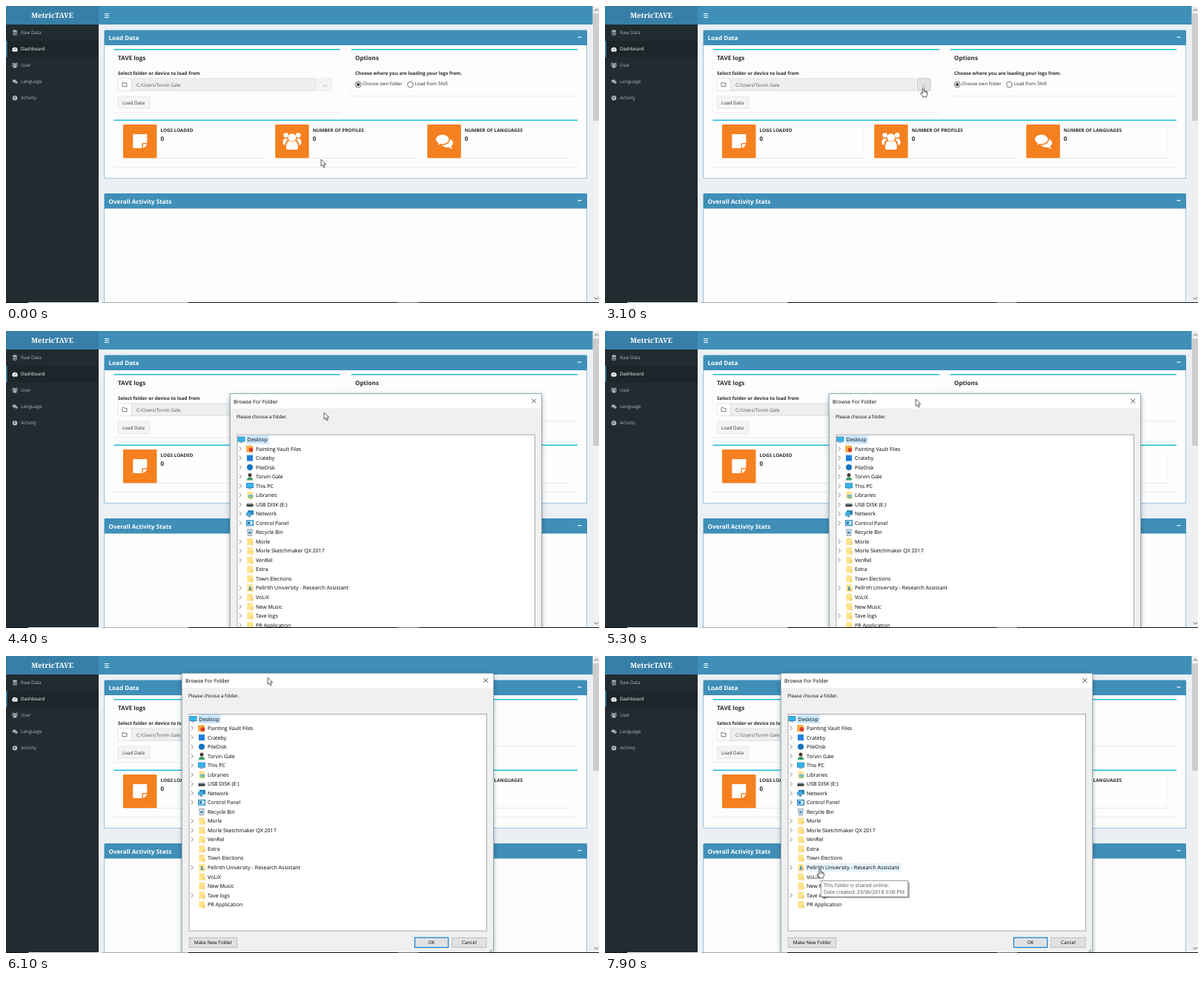
An HTML page for the animation above (8 s loop, 800 px wide and 401 px high).

```html
<!DOCTYPE html>
<html lang="en">
<head>
<meta charset="utf-8">
<title>Dashboard</title>
<style>
html, body { margin: 0; width: 100%; height: 100%; overflow: hidden; background: #ecf0f5; }
svg { display: block; width: 800px; height: 401px; }
text { font: 6.3px "Open Sans", "Noto Sans", sans-serif; fill: #2b2b2b; text-rendering: geometricPrecision; }
.brand { font: 700 9.6px "Noto Serif", serif; fill: #fff; text-anchor: middle; }
.head { font-size: 8.1px; font-weight: 700; }
.bold { font-size: 6.35px; font-weight: 700; }
.count { font-size: 8px; font-weight: 700; }
.radio { font-size: 6.15px; }
.white { fill: #fff; }
.nav { fill: #aab7bd; }
.muted { fill: #555; font-size: 6.25px; }
.dlg text { fill: #000; font-size: 7.05px; }
.dlg .small { font-size: 6.4px; }
.mid { text-anchor: middle; }
.tip text { fill: #4f4f4f; font-size: 6.9px; }
.line { fill: none; stroke-linecap: round; stroke-linejoin: round; }
</style>
</head>
<body>
<svg viewBox="0 0 800 401" xmlns="http://www.w3.org/2000/svg">
  <defs>
    <g id="users">
      <circle cy="-5" r="5.300"/>
      <path d="M-8 9C-8 2-5-1-3.500 0Q0 2 3.500 0C5-1 8 2 8 9Q8 11.500 5 11.500H-5Q-8 11.500-8 9Z"/>
      <g id="side">
        <circle cx="-8.300" cy="-8" r="3.300"/>
        <path d="M-6-2Q-9.500 1-9.500 5H-10.500Q-12.500 5-12.500 2.500C-12.500-2-11-4-9.500-3.500Q-8-3-6.500-3.500Z"/>
      </g>
      <use href="#side" transform="scale(-1 1)"/>
    </g>
    <g id="chat">
      <ellipse cx="4" cy="2.500" rx="8" ry="6"/>
      <path d="M5 7Q8 10 11 10.500Q9 8 9 5Z"/>
      <path d="M-2.500-9.500C3-9.500 7.200-6.500 7.200-2.500S3 4.500-2.500 4.500L-5 4.300Q-7 6.500-10.500 6.800Q-8.500 5-8.300 3Q-12-.200-12-2.500C-12-6.500-8-9.500-2.500-9.500Z" stroke="var(--gap)" stroke-width="1.600"/>
    </g>
    <g id="note">
      <path d="M-9.500-8.500Q-9.500-9.500-8.500-9.500H8.500Q9.500-9.500 9.500-8.500V2.500H4Q2.500 2.500 2.500 4V9.500H-8.500Q-9.500 9.500-9.500 8.500Z"/>
      <path d="M4 4H9.300Q9 5.500 8 6.600L6.600 8Q5.500 9 4 9.300Z"/>
    </g>
    <g id="arrow">
      <path d="M0 0V9.200L2.100 7.300L3.700 10.900L5.200 10.200L3.700 6.700H6.700Z" fill="#fff" stroke="#222" stroke-width=".700"/>
    </g>
    <g id="hand">
      <path d="M-1 1Q-1 0 0 0T1 1V4.300Q2 3.700 2.700 4.500Q3.700 4.100 4.200 5Q5.300 4.700 5.400 6V8.300Q5.400 10 4.500 11V12.300H-1V11.200L-3.500 7.600Q-3.800 6.500-2.800 6.500Q-1.800 6.600-1 7.700Z" fill="#fff" stroke="#222" stroke-width=".750"/>
      <path d="M1 4.300V6.500M2.700 4.700V6.600M4.200 5.200V6.800" class="line" stroke="#222" stroke-width=".500"/>
    </g>
    <filter id="shadow" x="-5%" y="-5%" width="110%" height="112%">
      <feDropShadow dx="0" dy="2" stdDeviation="3" flood-opacity=".300"/>
    </filter>
  </defs>

  <rect width="800" height="401" fill="#ecf0f5"/>
  <rect x="125" width="667" height="25" fill="#3f8fb8"/>
  <rect width="125" height="401" fill="#222b30"/>
  <rect width="125" height="25" fill="#387fa7"/>
  <rect y="47" width="125" height="22" fill="#1c2529"/>
  <rect y="47" width="1.500" height="22" fill="#3f8fb8"/>
  <text class="brand" x="62.500" y="16">MetricTAVE</text>
  <path d="M133 10.500H139M133 13H139M133 15.500H139" stroke="#fff" stroke-width="1.100"/>

  <g fill="#aab7bd" style="--gap:#222b30">
    <path d="M9 34Q9 32.300 12 32.300T15 34T12 35.500T9 34ZM9 35.700Q12 37.200 15 35.700V37Q12 38.500 9 37ZM9 38Q12 39.500 15 38V39Q12 40.500 9 39Z"/>
    <path d="M8.300 59.500A3.700 3.700 0 0 1 15.700 59.500L15 61.500H9Z" fill="#fff"/>
    <path d="M11.600 60L13 56.500M9.700 59H10.400M14 59H14.600" stroke="#1c2529" stroke-width=".700"/>
    <use href="#users" transform="translate(12 80) scale(.300)"/>
    <use href="#chat" transform="translate(12 102) scale(.300)"/>
    <circle cx="12" cy="124.300" r="3.300"/>
    <path d="M12 122.300V124.500H10.600" class="line" stroke="#222b30" stroke-width=".700"/>
  </g>
  <g id="nav"></g>

  <g id="panels"></g>
  <g id="cards"></g>

  <text class="head" x="151" y="72.800">TAVE logs</text>
  <text class="bold" x="151" y="92.700">Select folder or device to load from</text>
  <rect x="151" y="97.800" width="18.500" height="16.700" fill="#fff" stroke="#d2d6de" stroke-width=".600"/>
  <path d="M157.300 103.500H159.300L160 104.300H163V108.700H157.300Z" class="line" stroke="#444" stroke-width=".700"/>
  <rect x="169.500" y="97.800" width="249.300" height="16.700" fill="#eee" stroke="#d2d6de" stroke-width=".600"/>
  <text class="muted" x="176" y="108.500">C:/Users/Torvin Gale</text>
  <rect id="browse" x="421.300" y="97.800" width="17.700" height="16.700" rx="1" stroke-width=".600"/>
  <text class="mid" x="430.300" y="108">...</text>
  <rect x="151" y="122" width="43" height="16.500" rx="1" fill="#f4f4f4" stroke="#ddd" stroke-width=".600"/>
  <text x="157" y="132.700">Load Data</text>

  <text class="head" x="471" y="72.800">Options</text>
  <text class="bold" x="471" y="92.700">Choose where you are loading your logs from.</text>
  <circle id="ring" cx="475.200" cy="106" r="3.900" fill="#fff" stroke-width=".900"/>
  <circle id="dot" cx="475.200" cy="106" r="2"/>
  <text class="radio" x="481" y="106.800">Choose own folder</text>
  <circle cx="545.500" cy="106" r="3.900" fill="#fff" stroke="#555" stroke-width=".800"/>
  <text class="radio" x="551.500" y="106.800">Load from TAVE</text>

  <rect x="791.500" width="8.500" height="401" fill="#f0f0f0"/>
  <rect x="792" y="10" width="8" height="145" fill="#cdcdcd"/>
  <path d="M794 6.500L796.500 4L799 6.500M794 393.500L796.500 396L799 393.500" class="line" stroke="#505050" stroke-width="1"/>

  <g id="dialog" class="dlg">
    <rect width="421" height="378" fill="#f0f0f0" filter="url(#shadow)"/>
    <rect width="421" height="20" fill="#fff"/>
    <rect x=".200" y=".200" width="420.600" height="377.600" fill="none" stroke="#5d8299" stroke-width=".700"/>
    <text x="5" y="13">Browse For Folder</text>
    <path d="M407.300 7L413.300 13M413.300 7L407.300 13" stroke="#222" stroke-width=".800"/>
    <text class="small" x="9" y="33.300">Please choose a folder.</text>
    <rect x="10" y="55.600" width="401.300" height="292.500" fill="#fff" stroke="#828790" stroke-width=".700"/>
    <g id="rows"></g>
    <g id="buttons"></g>
    <path d="M419 372V377H414Z" fill="#bbb"/>
  </g>

  <g id="tip" class="tip">
    <rect x="293" y="305.500" width="118" height="21.500" fill="#000" opacity=".300"/>
    <rect x="291.300" y="303.500" width="117.500" height="21.500" fill="#fff" stroke="#767676" stroke-width=".700"/>
    <text x="295" y="312.300">This folder is shared online.</text>
    <text x="295" y="321.300">Date created: 23/06/2018 3:00 PM</text>
  </g>

  <rect y="400" width="800" height="1" fill="#111"/>
  <rect x="30" y="400" width="100" height="1" fill="#eee"/>
  <rect x="130" y="400" width="116" height="1" fill="#aaa"/>
  <rect x="529" y="400" width="27" height="1" fill="#777"/>

  <g id="cursor"><use href="#arrow"/><use href="#hand"/></g>
</svg>

<script>
const $ = id => document.getElementById(id);
const rect = (x, y, w, h, fill, more = '') =>
  `<rect x="${x}" y="${y}" width="${w}" height="${h}" fill="${fill}" ${more}/>`;
const label = (x, y, str, cls = '') => `<text x="${x}" y="${y}" class="${cls}">${str}</text>`;

// Sidebar
$('nav').innerHTML = ['Raw Data', 'Dashboard', 'User', 'Language', 'Activity']
  .map((s, i) => label(20, 38.2 + 22 * i, s, i === 1 ? 'white' : 'nav')).join('');

// Main boxes and the cyan-topped boxes inside; the page is shown at half size
const panel = (y, h, title) =>
  rect(132.5, y, 651.5, h, '#3f8fb8', 'rx="1.5"') +
  rect(133, y + 20.5, 650.5, h - 21, '#fdfdfd', 'rx=".5"') +
  label(138.5, y + 13.5, title, 'head white') +
  rect(771.5, y + 9, 4.8, 1.2, '#fff');
const inner = (x, y, w, h) =>
  rect(x, y, w, h, '#fdfdfd', 'stroke="#f5f5f5" stroke-width=".6"') +
  rect(x, y + h, w, .7, '#e6e6e6') +
  rect(x, y, w, 1.5, '#22bfdb');
$('panels').innerHTML =
  panel(32.5, 200.5, 'Load Data') + panel(253, 160, 'Overall Activity Stats') +
  inner(145.5, 58, 305.25, 85.5) + inner(465.75, 58, 305.25, 63.5) + inner(145.5, 153.5, 625.5, 64);

// Counter cards, three equal columns
const card = (column, title, icon) => {
  const x = 158 + 205.17 * column;
  return rect(x, 160, 190.2, 45, '#fefefe', 'stroke="#f4f4f4" stroke-width=".6"') +
    rect(x, 205, 190.2, .7, '#e3e3e3') +
    rect(x, 160, 45.5, 45.2, '#f58020', 'rx="1"') +
    `<use href="#${icon}" x="${x + 22.8}" y="182.5" fill="#fff" style="--gap:#f58020"/>` +
    label(x + 50.5, 169.9, title, 'bold') + label(x + 50.5, 182.3, '0', 'count');
};
$('cards').innerHTML = card(0, 'LOGS LOADED', 'note') +
  card(1, 'NUMBER OF PROFILES', 'users') + card(2, 'NUMBER OF LANGUAGES', 'chat');

// Tree icons, drawn in a 10 by 10 box
const folder = rect(1.3, .3, 7.9, 9.4, '#ffe48f', 'rx=".5"') + rect(7, 5, 2.5, 4.7, '#f6d170');
const screen = rect(0, 1, 10, 7, '#2f7fae') + rect(.7, 1.7, 8.6, 5.5, '#35b6ee') +
  rect(3, 8.5, 4, .8, '#678');
const person = (c, hair) => `<circle cx="5" cy="3" r="2.5" fill="${hair}"/>` +
  `<path d="M1 10Q1 5.8 5 5.8T9 10Z" fill="${c}"/>`;
const icons = {
  folder, screen,
  orange: rect(0, .5, 9, 9, '#f6b04a', 'rx="1"') + '<circle cx="6.5" cy="6.5" r="3" fill="#d8402b"/>',
  square: rect(1, 1, 8, 8, '#1f7fe0'),
  circle: '<circle cx="5" cy="5" r="4" fill="#1673bd"/>',
  person: person('#3a9a62', '#4a3a32'),
  library: folder + rect(3, 4.5, 6, 4, '#5fb4e0') + rect(4.5, 6, 3, 4, '#8fca72'),
  disk: rect(.5, 4, 9, 4, '#3c4043', 'rx="1"') + rect(1.5, 3, 7, 2, '#a9adb0'),
  network: rect(2, .5, 8, 6, '#2b82b5') + rect(0, 3, 7, 5, '#49a9dc') + rect(3, 8, 3, 1.5, '#5a7788'),
  control: rect(0, 1, 10, 8, '#2582b8') + rect(1, 2, 8, 6, '#8fd2f2') +
    '<circle cx="3.5" cy="5" r="1.7" fill="#2a73a5"/>' + rect(6, 3.5, 2, 3, '#fff'),
  bin: '<path d="M1.5 1H8.5L7.5 9.7H2.5Z" fill="#d5dde2" stroke="#7c8c96" stroke-width=".7"/>' +
    '<circle cx="5" cy="5.5" r="1.7" fill="#3c87c9"/>',
  shared: folder + `<g transform="translate(2.7 3) scale(.5)">${person('#2b78b8', '#2b78b8')}</g>`
};

// name, icon, chevron: 0 none, 1 always, 2 only while loading
const items = [
  ['Desktop', 'screen', 0], ['Painting Vault Files', 'orange', 1], ['Crateby', 'square', 1],
  ['PileDisk', 'circle', 1], ['Torvin Gale', 'person', 1], ['This PC', 'screen', 1],
  ['Libraries', 'library', 1], ['USB DISK (E:)', 'disk', 1], ['Network', 'network', 1],
  ['Control Panel', 'control', 1], ['Recycle Bin', 'bin', 0], ['Morle', 'folder', 1],
  ['Morle Sketchmaker QX 2017', 'folder', 1], ['VenRel', 'folder', 1], ['Extra', 'folder', 0],
  ['Town Elections', 'folder', 0], ['Pellrith University - Research Assistant', 'shared', 1],
  ['VoLiX', 'folder', 2], ['New Music', 'folder', 2], ['Tave logs', 'folder', 1],
  ['PR Application', 'folder', 2]
];
const PITCH = 12.53, TOP = 55.75;
$('rows').innerHTML = items.map(([name, icon, chevron], i) => {
  const y = 62 + PITCH * i, x = i ? 22 : 10.5;
  const mark = chevron ? `<path d="M13 ${y - 2.5}L15.6 ${y}L13 ${y + 2.5}" class="line${
    chevron === 2 ? ' loading' : ''}" stroke="#777" stroke-width=".9"/>` : '';
  return `<g class="row">${rect(x + 11.5, y - 6, 0, 12, i ? '#e5f3fb' : '#cce8ff', 'class="hit"')}${mark}` +
    `<g transform="translate(${x} ${y - 5})">${icons[icon]}</g>${label(x + 13, y + 2.5, name)}</g>`;
}).join('');

const button = (x, w, str, main) =>
  rect(x, 357.2, w, 13.3, '#e1e1e1', `stroke="${main ? '#0078d7' : '#adadad'}" stroke-width="${main ? 1.1 : .7}"`) +
  label(x + w / 2, 366.3, str, 'small mid');
$('buttons').innerHTML = button(10.2, 64.5, 'Make New Folder') +
  button(314.5, 45.2, 'OK', true) + button(364.8, 46.2, 'Cancel');

const hits = [...document.querySelectorAll('.hit')];
const names = [...document.querySelectorAll('.row text')];
const loading = [...document.querySelectorAll('.loading')];
const [arrow, hand] = $('cursor').children;

// time, x, y, eased arrival
const pointerPath = [
  [0, 425, 207], [500, 425, 207], [1500, 488, 104, 1], [2000, 488, 104], [2800, 429.5, 110.5, 1],
  [4900, 429, 110], [5400, 418, 90, 1], [5900, 367, 47], [6000, 358, 36], [6100, 353, 29],
  [6400, 353, 29], [7000, 290, 287.5, 1], [8000, 290, 287.5]
];
const dialogPath = [[0, 302, 84.5], [5500, 302, 84.5], [5900, 258, 49], [6100, 237, 23], [8000, 237, 23]];
const LOOP = 8000, OPEN = 3800, LOADED = 5000, TIP = 7400;

function at(path, t) {
  const i = path.findIndex(k => k[0] > t);
  const [t0, x0, y0] = path[i - 1], [t1, x1, y1, eased] = path[i];
  let u = (t - t0) / (t1 - t0);
  if (eased) u = u * u * (3 - 2 * u);
  return [x0 + (x1 - x0) * u, y0 + (y1 - y0) * u];
}
const within = (x, y, l, t, r, b) => x >= l && x <= r && y >= t && y <= b;
const show = (node, on) => { node.style.display = on ? '' : 'none'; };
const move = (node, x, y) => node.setAttribute('transform', `translate(${x} ${y})`);

function draw(t) {
  const [cx, cy] = at(pointerPath, t), [dx, dy] = at(dialogPath, t);
  const open = t >= OPEN;
  show($('dialog'), open);
  move($('dialog'), dx, dy);
  loading.forEach(mark => show(mark, t < LOADED));
  show($('tip'), t >= TIP);

  const onRadio = !open && within(cx, cy, 470, 101, 536, 111);
  const onBrowse = !open && within(cx, cy, 421, 98, 439, 114.5);
  const row = open ? Math.floor((cy - dy - TOP) / PITCH) : -1;
  let onRow = false;
  hits.forEach((hit, i) => {
    const width = names[i].getComputedTextLength() + 3.5;
    const hover = i === row && within(cx - dx, 0, 22, 0, 33 + width, 0);
    onRow = onRow || hover;
    hit.setAttribute('width', !i || hover ? width : 0);
  });

  $('ring').setAttribute('stroke', onRadio ? '#0078d7' : '#555');
  $('dot').setAttribute('fill', onRadio ? '#1a6fae' : '#222');
  $('browse').setAttribute('fill', onBrowse ? '#e2e2e2' : '#f4f4f4');
  $('browse').setAttribute('stroke', onBrowse ? '#adadad' : '#ddd');

  const point = onRadio || onBrowse || onRow;
  show(arrow, !point);
  show(hand, point);
  move($('cursor'), cx, cy);
}

// The screen advances ten times a second
const start = performance.now();
function tick() {
  draw(Math.floor((performance.now() - start) / 100) * 100 % LOOP);
  requestAnimationFrame(tick);
}
tick();
</script>
</body>
</html>
```
